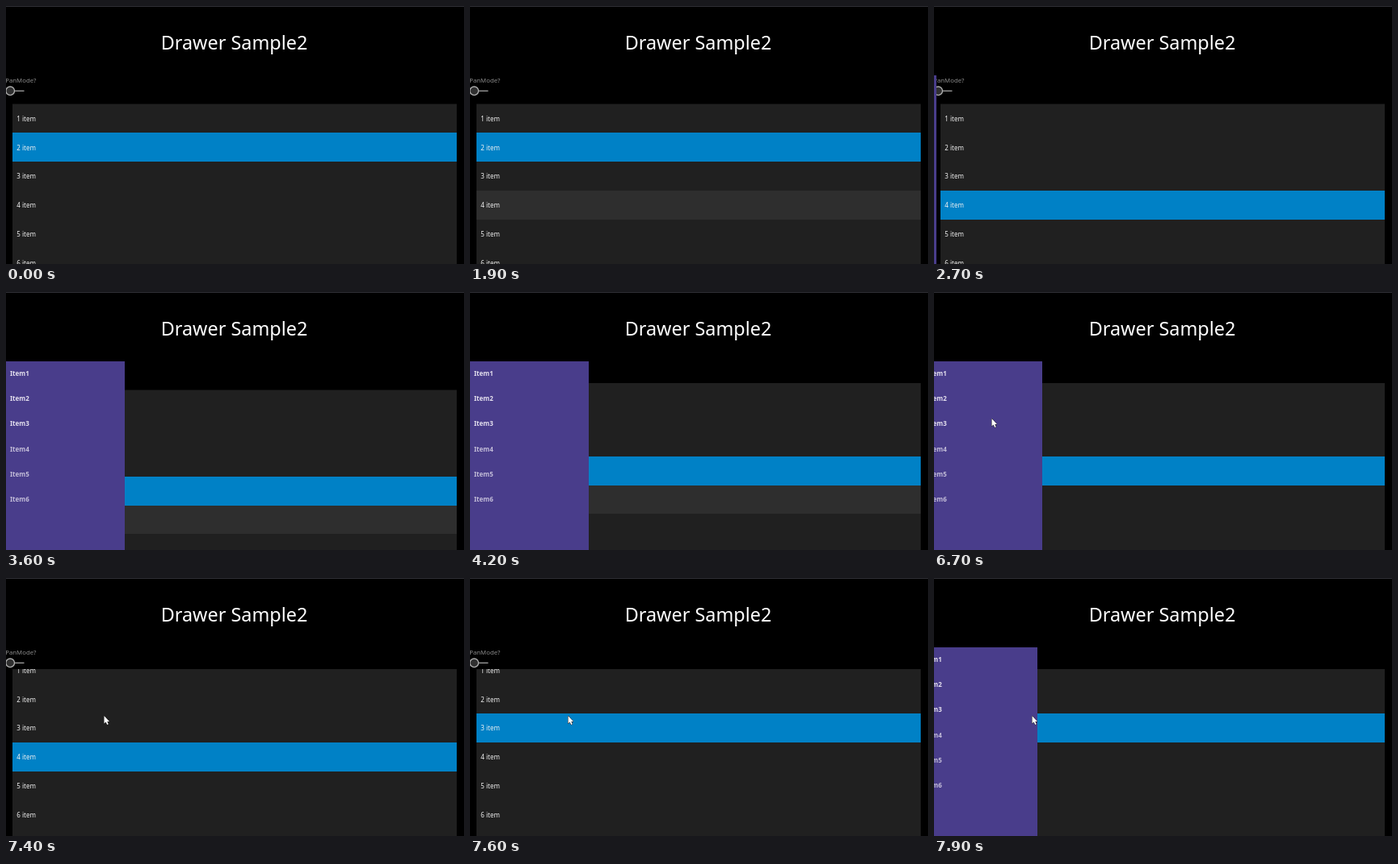
These frames come from a looping animation (567x320 px, 8000 ms). An HTML page with a canvas:

```html
<!DOCTYPE html>
<html lang="en">
<head>
<meta charset="utf-8">
<title>Drawer Sample2</title>
<style>
html, body { margin: 0; width: 100%; height: 100%; overflow: hidden; background: #000; }
canvas { display: block; }
</style>
</head>
<body>
<canvas id="stage" width="567" height="320"></canvas>
<script>
const ctx = document.getElementById('stage').getContext('2d');
const LOOP = 8000, STEP = 100;
const ROW = 35.75, LIST_TOP = 113, DRAWER_WIDTH = 147, DRAWER_TOP = 86;

// Keys are [time, value]; the last one reached holds.
const hold = (keys, t) => keys.reduce((v, [time, value]) => t >= time ? value : v, 0);
const selectedKeys = [[0, 2], [2300, 4], [7500, 3]];
const hoverKeys = [[1500, 3], [1900, 4], [2300, 0], [3600, 5], [4500, 6], [4900, 5], [5100, 4], [5300, 0]];

const progress = (t, start, length) => Math.min(1, Math.max(0, (t - start) / length));
const easeOut = p => 1 - (1 - p) ** 3;
const easeInOut = p => p < 0.5 ? 4 * p ** 3 : 1 - 4 * (1 - p) ** 3;
const slide = (t, start) => easeInOut(progress(t, start, 360));

function rect(x, y, w, h, color) {
  ctx.fillStyle = color;
  ctx.fillRect(x, y, w, h);
}

function text(str, x, y, size, color, weight = 400) {
  ctx.font = `${weight} ${size}px "Noto Sans", "Open Sans", sans-serif`;
  ctx.fillStyle = color;
  ctx.fillText(str, x, y);
}

function drawHeader() {
  rect(0, 0, 567, 1, '#303036');
  ctx.textAlign = 'center';
  text('Drawer Sample2', 282.5, 53.5, 23.4, '#fff');
  ctx.textAlign = 'left';
  text('PanMode?', -0.8, 94.5, 7.8, '#8c8c8c');
}

function drawSwitch() {
  rect(11, 104.7, 11.5, 1.3, '#a0a0a0');
  ctx.beginPath();
  ctx.arc(5.2, 105.3, 5.3, 0, 7);
  ctx.fillStyle = '#303030';
  ctx.fill();
  ctx.lineWidth = 1.3;
  ctx.strokeStyle = '#b0b0b0';
  ctx.stroke();
}

function drawList(t) {
  const scroll = 25 * easeOut(progress(t, 3750, 550));
  const selected = hold(selectedKeys, t), hover = hold(hoverKeys, t);
  ctx.save();
  ctx.beginPath();
  ctx.rect(8, LIST_TOP, 550, 320 - LIST_TOP);
  ctx.clip();
  const first = 121.5 - scroll;
  rect(8, first, 550, 320, '#202020');
  for (let i = 1; i <= 7; i++) {
    const top = first + (i - 1) * ROW;
    const y = Math.round(top), h = Math.round(top + ROW) - y;
    if (i === selected) rect(8, y, 550, h, '#0081c6');
    else if (i === hover) rect(8, y, 550, h, '#2e2e2e');
    text(i + ' item', 13.3, top + 21.4, 8, '#f2f2f2');
  }
  ctx.restore();
}

function drawDrawer(t) {
  const open = slide(t, 2640) - slide(t, 6600) + slide(t, 7655);
  if (open <= 0) return;
  const x = Math.round((open - 1) * DRAWER_WIDTH);
  rect(x, DRAWER_TOP, DRAWER_WIDTH, 320 - DRAWER_TOP, '#493d8b');
  for (let i = 0; i < 6; i++)
    text('Item' + (i + 1), x + 5, 103.8 + i * 31.3, 8, i < 3 ? '#e4e0ee' : '#c2bcd8', 600);
}

function drawCursor(t) {
  if (t < 5400) return;
  const arrive = easeOut(progress(t, 5400, 300)), leave = easeInOut(progress(t, 6800, 500));
  const x = 266 - 195 * arrive + 50 * leave;
  const y = 246 - 89 * arrive + 14 * leave;
  ctx.save();
  ctx.translate(x, y);
  const arrow = new Path2D('M.5 0V9.5L2.6 7.6 4.2 11 5.8 10.2 4.3 7H7Z');
  ctx.lineWidth = 1;
  ctx.strokeStyle = '#111';
  ctx.stroke(arrow);
  ctx.fillStyle = '#fff';
  ctx.fill(arrow);
  ctx.restore();
}

function frame() {
  const t = Math.floor(performance.now() % LOOP / STEP) * STEP;
  rect(0, 0, 567, 320, '#000');
  drawHeader();
  drawSwitch();
  drawList(t);
  drawDrawer(t);
  drawCursor(t);
  requestAnimationFrame(frame);
}
frame();
</script>
</body>
</html>
```
